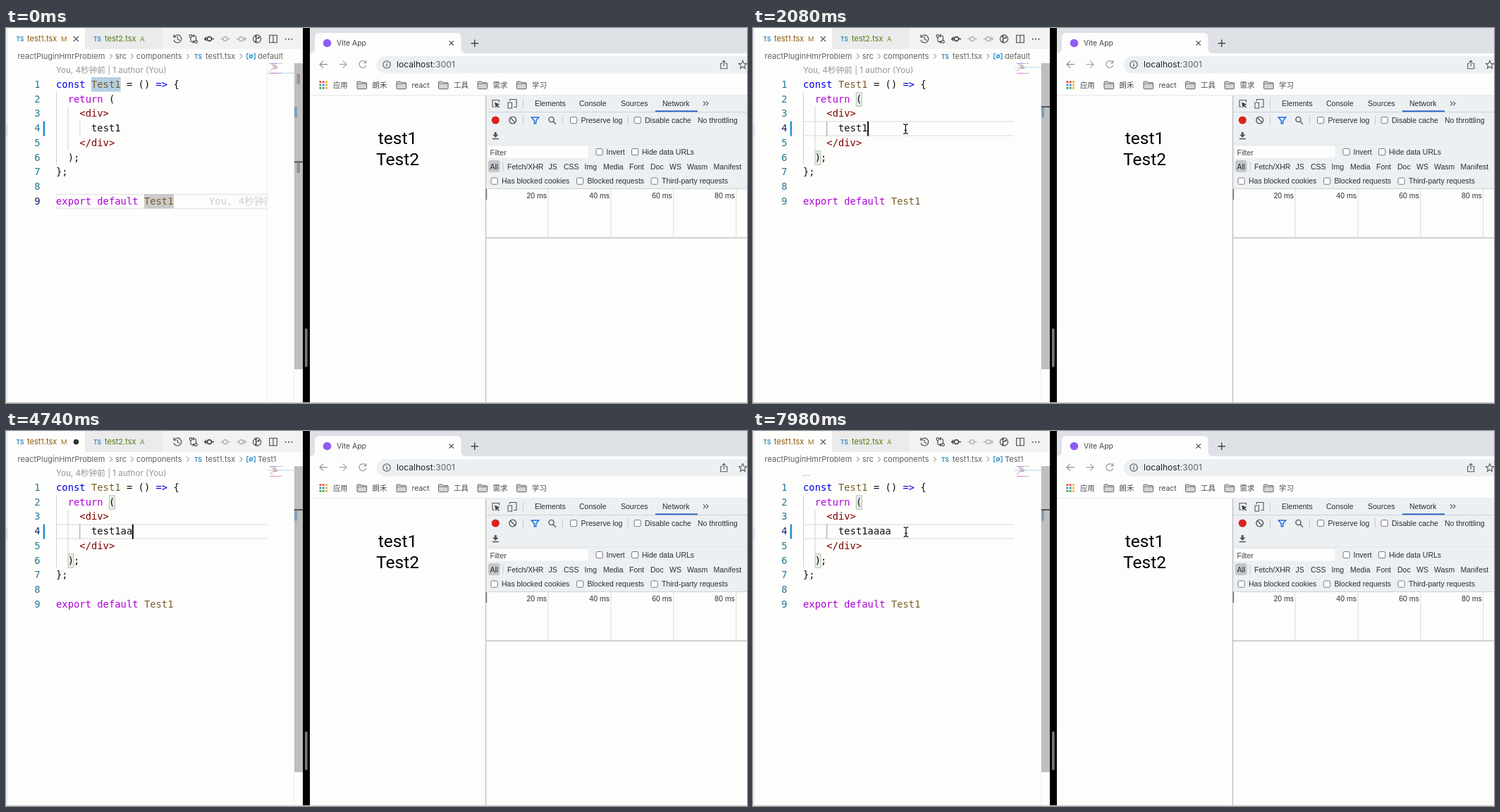
An HTML page for the animation above (8000 ms loop, 1051 by 533 pixels).

```html
<!DOCTYPE html>
<html lang="en">
<head>
<meta charset="utf-8">
<title>Editor and browser</title>
<style>
html, body { margin: 0; width: 100%; height: 100%; overflow: hidden; background: #fdfdfc; }
svg { display: block; width: 1051px; height: 533px; }
text { white-space: pre; }
.ui { font-family: Inter, "Noto Sans CJK SC", sans-serif; }
.dev { font-family: "Liberation Sans", Arial, sans-serif; font-size: 10.5px; fill: #2b2e31; }
.code { font-family: "DejaVu Sans Mono", "Noto Sans CJK SC", monospace; font-size: 13.84px; }
.page { font-family: Roboto, sans-serif; font-size: 24.5px; text-anchor: middle; }
</style>
</head>
<body>
<svg id="stage" viewBox="0 0 1051 533" xmlns="http://www.w3.org/2000/svg"></svg>
<script>
const CHAR = 13.84 * 0.602, LEFT = 71, LOOP = 8000;
const CLICK = 2060, KEYS = [3600, 4340, 5300, 6000], SAVE = 7100;
const SHOW_MOUSE = 7500;

const rect = (x, y, w, h, fill, more = '') =>
  `<rect x="${x}" y="${y}" width="${w}" height="${h}" fill="${fill}" ${more}/>`;
const line = (d, stroke = '#444', w = 1.1, more = '') =>
  `<path d="${d}" fill="none" stroke="${stroke}" stroke-width="${w}" ${more}/>`;
const ring = (x, y, r, stroke = '#444', w = 1.1) =>
  `<circle cx="${x}" cy="${y}" r="${r}" fill="none" stroke="${stroke}" stroke-width="${w}"/>`;
const dot = (x, y, r, fill) => `<circle cx="${x}" cy="${y}" r="${r}" fill="${fill}"/>`;
const ui = (x, y, s, size = 11, fill = '#616161', more = '') =>
  `<text class="ui" x="${x}" y="${y}" font-size="${size}" fill="${fill}" ${more}>${s}</text>`;
const dev = (x, y, s, more = '') => `<text class="dev" x="${x}" y="${y}" ${more}>${s}</text>`;
const group = (id, body, more = '') => `<g id="${id}" ${more}>${body}</g>`;
const cross = (x, y, r, c, w = 1.2) =>
  line(`M${x - r} ${y - r}l${2 * r} ${2 * r}M${x + r} ${y - r}l${-2 * r} ${2 * r}`, c, w);
const rowY = n => 84.8 + (n - 1) * 20.75;
const colX = c => LEFT + c * CHAR;

function code(row, col, ...tokens) {
  const spans = tokens.map(([s, c]) => `<tspan fill="${c}">${s}</tspan>`).join('');
  return `<text class="code" x="${colX(col)}" y="${rowY(row)}">${spans}</text>`;
}

function tabs() {
  const ts = (x, y) => ui(x, y, 'TS', 8.3, '#3f8fc0', 'font-weight="700"');
  const chevron = x => line(`M${x - 1.8} 36.7l3.4 3.5l-3.4 3.5`, '#777', 1);
  const commit = (x, c) => ring(x, 15.5, 3, c, 1.3) +
    line(`M${x - 6.5} 15.5h3.5M${x + 3} 15.5h3.5`, c, 1.3);
  return rect(0, 0, 421, 30, '#f2f2f3') + rect(2, 0, 110, 31, '#fdfdfc') +
    rect(112, 0, 110, 30, '#ebebec') +
    rect(0, 0, 2.5, 533, '#ececf2') + rect(0, 137, 2.5, 18, '#d9dcf2') +
    ts(14.5, 18.5) + ui(30, 19.3, 'test1.tsx', 11, '#895503') + ui(78, 18.8, 'M', 9.5, '#a06f20') +
    ts(124, 18.5) + ui(140, 19.3, 'test2.tsx', 11, '#527a10') + ui(190, 18.8, 'A', 9.5, '#6c8f30') +
    group('close', cross(99.5, 15.5, 3.6, '#444')) + group('dirty', dot(99.5, 15.5, 3.8, '#333')) +
    // title bar icons
    line('M238.6 12.5a5.5 5.5 0 1 1-.6 4.5M238 9.5v3.5h3.6M243.3 12v4l3 1.6') +
    ring(262, 11.5, 1.9) + ring(269.5, 19.5, 1.9) +
    line('M262 13.5v4.5q0 1.7 2 1.7h2.6M265 18l1.8 1.7l-1.8 1.8M269.5 17.4v-4.6q0-1.8-2-1.8h-2.5M266.7 9.2l-1.8 1.8l1.8 1.8') +
    commit(288.5, '#333') + line('M284.5 12.6l-3 2.9l3 2.9', '#333') +
    commit(311, '#b0b0b0') + commit(333.5, '#b0b0b0') + line('M337.5 12.6l3 2.9l-3 2.9', '#b0b0b0') +
    ring(356, 15.5, 5.6) + line('M354.5 11v9M354.5 16l3.8-2.5') + dot(354.5, 12, 1.3, '#444') +
    dot(354.5, 19, 1.3, '#444') + dot(358.5, 13.8, 1.3, '#444') +
    line('M373.7 10.2h10.6v10.6h-10.6zM379 10.2v10.6') +
    dot(396.7, 15.7, 1, '#444') + dot(401, 15.7, 1, '#444') + dot(405.3, 15.7, 1, '#444') +
    // breadcrumb
    ui(16.5, 44.3, 'reactPluginHmrProblem') + chevron(149) + ui(155, 44.3, 'src') + chevron(179) +
    ui(185, 44.3, 'components') + chevron(258) + ts(267, 43.5) + ui(283, 44.3, 'test1.tsx') +
    chevron(333.5) +
    line('M344 36.5h-2.2v7.5h2.2M351 36.5h2.2v7.5h-2.2', '#1a85c8', 1.1) +
    ring(347.5, 40.2, 2.2, '#1a85c8') + line('M345.2 42.5l4.6-4.6', '#1a85c8', 1) +
    '<text class="ui" id="crumb" x="357" y="44.3" font-size="11" fill="#616161"></text>';
}

function minimap(y0) {
  const rows = [[0, 9, '#8080d0'], [2, 6, '#c890d8'], [4, 5, '#b07070'], [6, 5, '#888'],
    [4, 6, '#b07070'], [2, 2, '#999'], [0, 2, '#999'], [0, 0, '#fff'], [0, 9, '#c868c8']];
  return rect(371, y0, 38, 1.6, '#cfe3f5') +
    rows.map(([x, w, c], i) => rect(374 + x, 49.8 + i * 1.75, w * 1.1, 1.1, c, 'opacity=".75"')).join('') +
    rect(384, 49.8, 8, 1, '#aaa', 'opacity=".7"') + rect(384, 63.8, 7, 1.1, '#c8a8c8');
}

function editor() {
  const K = '#0000f0', P = '#af00db', F = '#795e26', T = '#800000', B = '#111', G = '#d0d0d0';
  const nums = Array.from({ length: 9 }, (_, i) =>
    `<text class="code" id="n${i + 1}" x="48.6" y="${rowY(i + 1)}" text-anchor="end"></text>`).join('');
  const row = y => line(`M71 ${y}H371M71 ${y + 20}H371`, '#e6e6e6', 1.5) + line(`M71.5 ${y}v20`, '#e6e6e6');
  const bracket = (x, y) => rect(x, y, 8, 19.5, '#e4eee4', 'stroke="#b9b9b9" stroke-width=".9"');
  const ghost = (r, c, s) => `<text class="code" x="${c}" y="${rowY(r)}" fill="#cfcfcf">${s}</text>`;
  return '<clipPath id="pane"><rect x="0" y="50" width="370.5" height="483"/></clipPath>' +
    '<g clip-path="url(#pane)">' +
    group('before', row(236.5) + rect(121, 70, 41.7, 20.5, '#b4cfe2') + rect(196, 236, 42, 20.5, '#cacaca') +
      ghost(9, 288, 'You, 4秒钟前 • Uncommitted changes')) +
    group('after', row(133) + bracket(146.3, 91.8) + bracket(88, 174.8)) +
    group('blame', ghost(4, colX(17), 'You, 16秒钟前 • Uncommitted changes')) +
    line('M71.5 91V194M88 112V174', G, 1) +
    line('M104.8 132.5V153.5', G, 1, 'id="guide"') +
    rect(52.6, 132.5, 2.6, 21, '#2492d4') + nums +
    '<text class="ui" id="lens" x="71" y="64" font-size="11.65" fill="#979797"></text>' +
    code(1, 0, ['const', K], [' Test1', F], [' = () ', B], ['=&gt;', K], [' {', B]) +
    code(2, 2, ['return', P], [' (', B]) +
    code(3, 4, ['&lt;div&gt;', T]) +
    `<text class="code" id="typed" x="${colX(6)}" y="${rowY(4)}" fill="#111"></text>` +
    code(5, 4, ['&lt;/div&gt;', T]) + code(6, 2, [');', B]) + code(7, 0, ['};', B]) +
    code(9, 0, ['export default', P], [' Test1', F]) +
    rect(0, 0, 1.9, 20.8, '#000', 'id="caret"') + '</g>' +
    // overview ruler
    rect(408, 50, 1, 483, '#eeeeee') + rect(409, 50, 12, 435, '#bebebe') +
    group('mapBefore', line('M370.5 50V533', '#ececec') + minimap(63.4) +
      rect(412.5, 65, 4.5, 15, '#a08f9c') + rect(409, 112, 4, 15, '#809fb8') +
      rect(409, 189.5, 12, 1.7, '#444') + rect(412.5, 191, 4.5, 15, '#929292')) +
    group('mapAfter', minimap(55) + rect(409, 112.5, 4, 15, '#809fb8') + rect(409, 111.2, 12, 1.7, '#444'));
}

function browser() {
  const folder = x => `<path d="M${x} 77q0-1 1-1h4l1.4 1.6h6.2q1 0 1 1v7q0 1-1 1h-11.600q-1 0-1-1z" fill="#d4d4d4" stroke="#666" stroke-width="1"/>` +
    line(`M${x} 79.300h13.600`, '#777', .9);
  const marks = [[498, '朗禾'], [554, 'react'], [613.5, '工具'], [669, '需求'], [724.5, '学习']];
  const hues = ['#e0483a', '#e0483a', '#e8b030', '#3f9d58', '#4285f4', '#e8b030', '#3f9d58', '#3f9d58', '#e8b030'];
  return rect(421, 0, 10, 533, '#000') + rect(424, 427, 3.6, 55, '#777', 'rx="1.8"') +
    rect(431, 0, 620, 36, '#dee1e6') + rect(431, 36, 620, 60, '#fdfdfd') +
    '<path d="M430 36q8 0 8-7V14q0-7 7-7h193.500q7 0 7 7v15q0 7 7 7z" fill="#fdfdfd"/>' +
    dot(455.5, 21.5, 5.8, '#8d5cf6') + ui(469, 25.300, 'Vite App', 10.4, '#454746') +
    cross(631.7, 21.5, 3.2, '#444') + line('M659.500 21.700h10.500M664.750 16.400v10.500', '#444', 1.4) +
    line('M456 51.700h-10.800M450 46.700l-5 5l5 5', '#8b8e91', 1.2) +
    line('M472.500 51.700h10.500M478 46.700l5 5l-5 5', '#a2a5a8', 1.2) +
    line('M510 48.500a5 5 0 1 0 .8 4.500M510.700 46v3.600h-3.600', '#9da0a3', 1.3) +
    rect(525.5, 40, 560, 24.500, '#edf0f2', 'rx="12.2"') +
    ring(540, 52, 5.2, '#4f5356', 1.1) + line('M540 51v3.700M540 48.800v1.200', '#4f5356', 1.2) +
    ui(554, 56.200, 'localhost<tspan fill="#5f6368">:3001</tspan>', 12.1, '#202124') +
    line('M1016 50.500h-2.300v7.300h9v-7.300h-2.300M1018.200 54.500v-8M1015.800 48.800l2.400-2.400l2.400 2.400', '#55595c') +
    line('M1045 46.500l1.600 3.700l4 .4l-3 2.700l.9 4l-3.500-2.100l-3.500 2.100l.9-4l-3-2.700l4-.4z', '#55595c') +
    hues.map((c, i) => rect(444.5 + i % 3 * 4.300, 75.300 + Math.floor(i / 3) * 4.300, 2.800, 2.800, c)).join('') +
    ui(464, 85, '应用', 10.3, '#454746') +
    marks.map(([x, s]) => folder(x) + ui(x + 21.5, 85, s, 10.4, '#454746')).join('') +
    rect(431, 95.300, 620, .9, '#e2e2e2') +
    '<text class="page" x="555.5" y="164.500">test1</text><text class="page" x="555.5" y="195">Test2</text>';
}

function devtools() {
  const box = (x, y) => rect(x, y, 9.200, 9.200, '#fff', 'rx="1.8" stroke="#777" stroke-width="1"');
  const check = (x, y, s, gap = 15.500) => box(x + .5, y - 8.300) + dev(x + gap, y, s);
  const bar = (x, y) => rect(x, y, 1, 13, '#c6c9cd');
  const kinds = [[686.5, 'All'], [711, 'Fetch/XHR'], [769.5, 'JS'], [791, 'CSS'], [820.5, 'Img'], [847, 'Media'],
    [884, 'Font'], [914, 'Doc'], [941, 'WS'], [966, 'Wasm'], [1003.5, 'Manifest']];
  return rect(680, 96, 371, 132, '#edf0f3') + rect(680, 119, 371, 1, '#cdd1d6') +
    rect(680, 164.500, 371, .8, '#dde0e4') + rect(680, 228, 371, 1, '#cdd1d6') +
    rect(680, 297.500, 371, 1.600, '#c3c6ca') + rect(679.8, 96, 1.400, 437, '#bfc2c6') +
    line('M693 112h-3v-9.500h9.500v3', '#555') +
    '<path d="M693 105.500l7.500 3l-3.200 1.200l2.700 2.700l-1.200 1.200l-2.700-2.700l-1.300 3z" fill="#444"/>' +
    line('M714.500 104v-2.500h9.500v11h-4M712 106h5.500v8h-5.500z', '#555') + bar(733, 101) +
    dev(750, 111.200, 'Elements') + dev(813, 111.200, 'Console') + dev(872, 111.200, 'Sources') +
    dev(931, 111.200, 'Network', 'fill="#111"') + rect(921, 117.300, 60, 1.900, '#2a62c4') +
    line('M989 104.300l3 3l-3 3M993 104.300l3 3l-3 3', '#555') +
    dot(694.3, 131, 5.600, '#d9251d') + ring(718.700, 131, 4.900, '#555', 1.400) +
    line('M715.300 127.600l6.900 6.900', '#555', 1.400) + bar(733, 124.500) +
    line('M745.300 127h10.400l-4 4.800v4h-2.400v-4z', '#1a6ee0', 1.500) +
    ring(773.5, 130, 3.600, '#555', 1.400) + line('M776 132.700l4 4', '#555', 1.500) + bar(789, 124.500) +
    check(800, 134.800, 'Preserve log') + bar(882, 124.500) + check(890.5, 134.800, 'Disable cache') +
    dev(981, 134.800, 'No throttling') +
    '<path d="M692.800 148h3v3.500h2.700l-4.200 4.200l-4.200-4.200h2.700zM689.800 156.800h9v1.400h-9z" fill="#555"/>' +
    rect(683.5, 168, 142, 16.500, '#fdfdfd') + dev(686.5, 180.500, 'Filter', 'style="fill:#444"') +
    check(836.5, 179.800, 'Invert', 15) + check(887, 179.800, 'Hide data URLs', 15) +
    rect(684, 188, 16.500, 17, '#c5c7ca', 'rx="3.500"') + bar(704.5, 190.500) +
    kinds.map(([x, s]) => dev(x, 200.600, s)).join('') +
    check(687.5, 221.300, 'Has blocked cookies') + check(809, 221.300, 'Blocked requests') +
    check(914.5, 221.300, 'Third-party requests') +
    [20, 40, 60, 80].map((n, i) => rect(768.5 + i * 88.900, 229, 1, 68, '#dcdcdc') +
      dev(767 + i * 88.900, 242, n + ' ms', 'text-anchor="end"')).join('') +
    rect(680.5, 229, 1.700, 15, '#777');
}

const beam = group('mouse', ['#fff', '#111'].map((c, i) =>
  line('M-3.300 -6.800q3.300 0 3.300 2v9.600q0 2 -3.300 2M3.300 -6.800q-3.300 0 -3.300 2v9.600q0 2 3.300 2M-1.700 1.800h3.400',
    c, i ? 1.2 : 2.6)).join(''));

document.getElementById('stage').innerHTML = rect(0, 0, 1051, 533, '#fdfdfc') +
  tabs() + editor() + browser() + devtools() + rect(0, 532, 1051, 1, '#c9c9c1') + beam;

const el = id => document.getElementById(id);
const show = (id, on) => el(id).setAttribute('visibility', on ? 'visible' : 'hidden');
const set = (id, s) => { if (el(id).textContent !== s) el(id).textContent = s; };
for (let i = 1; i <= 9; i++) set('n' + i, String(i));

// time, x, y of the pointer
const path = [[300, 248, 240], [480, 242, 242.5], [860, 242, 242.5], [1300, 221, 144],
  [1500, 221, 144], [1850, 216.5, 143.5], [7500, 216.5, 143.5], [7850, 217, 143.5]];

function pointer(t) {
  const i = path.findIndex(p => p[0] > t);
  if (i < 0) return path[path.length - 1].slice(1);
  if (i === 0) return path[0].slice(1);
  const [a, b] = [path[i - 1], path[i]];
  const u = (t - a[0]) / (b[0] - a[0]), e = u * u * (3 - 2 * u);
  return [a[1] + (b[1] - a[1]) * e, a[2] + (b[2] - a[2]) * e];
}

function draw(t) {
  const moved = t >= CLICK, count = KEYS.filter(k => t >= k).length;
  const saved = t >= SAVE, dirty = count > 0 && !saved;
  show('before', !moved);
  show('mapBefore', !moved);
  show('after', moved);
  show('mapAfter', moved);
  show('blame', t >= CLICK + 160 && !count);
  show('close', !dirty);
  show('dirty', dirty);
  for (let i = 1; i <= 9; i++) el('n' + i).setAttribute('fill', i === (moved ? 4 : 9) ? '#0b216f' : '#237893');
  el('guide').setAttribute('stroke', moved ? '#999' : '#d0d0d0');
  set('crumb', t >= CLICK + 200 ? 'Test1' : 'default');
  set('lens', saved ? '…' : 'You, 4秒钟前 | 1 author (You)');
  set('typed', 'test1' + 'a'.repeat(count));

  const reset = [-950, CLICK, ...KEYS].filter(k => k <= t).pop();
  show('caret', (t - reset) % 1000 < 500);
  el('caret').setAttribute('x', moved ? colX(11 + count) - .4 : 237.3);
  el('caret').setAttribute('y', moved ? 132.7 : 236);

  show('mouse', (t >= path[0][0] && !count) || t >= SHOW_MOUSE);
  el('mouse').setAttribute('transform', `translate(${pointer(t).join(' ')})`);
}

const start = performance.now();
function tick() {
  draw((performance.now() - start) % LOOP);
  requestAnimationFrame(tick);
}
draw(0);
requestAnimationFrame(tick);
</script>
</body>
</html>
```
